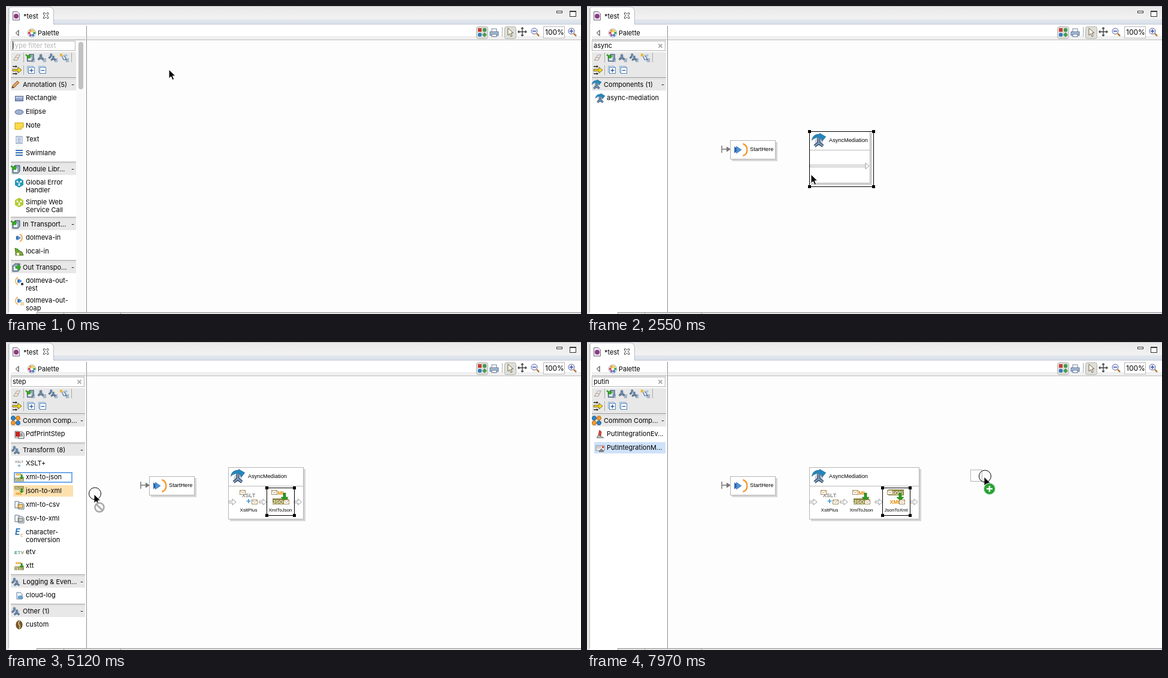
These frames come from a looping animation (960x514 px, 7990 ms). An HTML page:

```html
<!DOCTYPE html>
<html lang="en">
<head>
<meta charset="utf-8">
<title>Palette editor</title>
<style>
html, body { margin: 0; width: 100%; height: 100%; overflow: hidden; background: #fff; }
svg { display: block; width: 100vw; height: 100vh; }
text { font: 11px Inter, "Open Sans", sans-serif; fill: #000; white-space: pre; }
.node { font: 9.2px "Liberation Sans", Arial, sans-serif; }
.step { font: 8px "Liberation Sans", Arial, sans-serif; text-anchor: middle; }
.tag { font: bold 9px "Liberation Sans", Arial, sans-serif; text-anchor: middle; }
.zoom { font-size: 12px; }
.hint { fill: #b4b4b4; }
.hover { fill: #fce1af; }
.press { fill: #cfe2f9; }
.focus { fill: #fff; stroke: #70a9ea; stroke-width: 2; }
</style>
</head>
<body>
<svg id="stage" viewBox="0 0 960 514" preserveAspectRatio="none"></svg>
<script>
const LOOP = 7990;
const stage = document.getElementById('stage');

// Drawing helpers
const box = (x, y, w, h, fill, more = '') => `<rect x="${x}" y="${y}" width="${w}" height="${h}" fill="${fill}" ${more}/>`;
const shape = (d, fill, stroke = 'none', width = 1) => `<path d="${d}" fill="${fill}" stroke="${stroke}" stroke-width="${width}"/>`;
const dot = (x, y, r, fill, stroke = 'none') => `<circle cx="${x}" cy="${y}" r="${r}" fill="${fill}" stroke="${stroke}"/>`;
const text = (x, y, s, cls = '', more = '') => `<text x="${x}" y="${y}" class="${cls}" ${more}>${s.replace(/&/g, '&amp;')}</text>`;
const tag = (x, y, s, color) => text(x, y, s, 'tag', `style="fill:${color}"`);
const use = (name, x, y, scale = 1) => `<use href="#${name}" transform="translate(${x} ${y}) scale(${scale})"/>`;
const group = (id, body) => `<g id="${id}">${body}</g>`;
const at = (x, y, scale, body) => `<g transform="translate(${x} ${y}) scale(${scale})">${body}</g>`;

// Icons, centred on 0,0
const hex = color => shape('M0-8L7-4V4L0 8-7 4V-4Z', color) +
  shape('M-3-1.500L0 1V4M0 1L3-1.500', 'none', '#fff', 1) + [-3, 3].map(x => dot(x, -2, 1.6, '#fff')).join('') + dot(0, 3.5, 1.6, '#fff');
const cube = shape('M-4-3L-1-6H7V4L4 7H-5V-3Z', '#8ea6b8', '#3c5468') + box(-3, -1, 6, 6, '#eef4f8');
const greenArrow = shape('M-7-6L-3-3 0-6 1 1-6 1-4-1-8-4Z', '#35b01d', '#187a0d', .6);
const doc = (color, x = 0, y = 0) => shape(`M${x - 4} ${y - 5}h6l3 3v8h-9Z`, '#f1f6fc', color);
const play = shape('M-6-4.500L-1 0-6 4.500Z', '#2b62a8') + shape('M-3.500-4.500L3 0-3.500 4.500Z', '#4f94d6', '#2b62a8', .6);
const arc = shape('M1-6A6.500 6.500 0 0 1 1 6', 'none', '#f4952b', 1.6);
const portOut = shape('M-2-6A6.500 6.500 0 0 0-2 6', 'none', '#f4a53a', 1.4) + at(2, 0, .8, play);
const arms = 'M0-5V1L-5 5M0 1L5 5';
const figure = dot(0, 0, 5, '#c9d4de') + shape(arms, 'none', '#3d526c', 3.6) + shape(arms, 'none', '#87aacd', 1.3);
const pair = at(-2, -2, .85, figure) + at(2, 2, .85, figure);
const stripes = shape('M3 2.500H9M3 5H9M3 7.500H9', 'none', '#5c7ca6', 1.2);
const green = x => shape(`M${x - 2}-8h4v7h4l-6 6-6-6h4Z`, '#2e9a1f', '#166c10', .6);
const band = (s, y) => s === 'XML'
  ? tag(-1, y + 9, s, '#e08a00')
  : box(-13, y, 26, 10, '#8d8a4b') + tag(-1, y + 8.5, s, '#f7f1cf');
const convert = (top, bottom) => band(top, -14) + band(bottom, 1) + green(7);
const sheets = color => doc('#5c6f88', -3, -1) + doc('#5c6f88', 3, 1) + box(-2, -1, 8, 6, color, 'stroke="#775b20" stroke-width=".7"') + shape('M0 1H5M0 3H5', 'none', '#fff');
const lens = sign => shape('M3 3L7 7', 'none', '#b07a35', 2.5) + dot(-1, -1, 5, '#eef2ff', '#5c5f95') + shape(sign, 'none', '#3953a4', 1.5);
const page = color => doc('#9cb2cc', -1) + shape('M-4-1H2M-4 2H2', 'none', '#6fa2d6') + shape('M1 2H7L4 6Z', color);

const icons = {
  pencil: shape('M-6 6L-5 2 3-6 6-3-2 5Z', '#dba35e', '#8a5626') + shape('M-6 6L-5 3-3 5Z', '#333'),
  rect: box(-6.5, -3.5, 13, 8, '#8ba2cb', 'stroke="#50648f"') + box(-6, -3, 12, 3, '#b4c4df'),
  oval: '<ellipse rx="7" ry="4" fill="#9fb1d2" stroke="#5d709b"/>',
  note: shape('M-7-5H7V2L3 6H-7Z', '#ffdc45', '#c69c16') + shape('M7 2H3V6Z', '#fff3b0', '#c69c16', .7),
  lines: box(-5, -5.5, 10, 12, '#f0f5fb', 'stroke="#7f95b5"') + shape('M-3-3H3M-3-.5H3M-3 2H3M-3 4.500H3', 'none', '#6d8fbd'),
  lanes: shape('M-6-5H6M-6-1H6M-6 3H6', 'none', '#3670b3', 2),
  module: cube + greenArrow,
  outbox: cube + at(5, 1, 1, shape('M-5-2L-1-2V-6L4-1-1 4V1H-5Z', '#35b01d', '#187a0d', .6)),
  hexBlue: hex('#2498b8'), hexLime: hex('#b4cb32'),
  portIn: at(0, 0, .85, play) + arc,
  portRest: portOut + box(3, 3, 4, 4, '#445'),
  portSoap: portOut + box(3, 3, 4, 4, '#fff2c8', 'stroke="#c9973d" stroke-width=".7"'),
  startPort: at(-1.5, 0, .9, play) + shape('M3-7A7.500 7.500 0 0 1 3 7', 'none', '#f4952b', 1.6),
  local: shape('M-7-6L5 1 7 6H-6V1Z', '#83a838', '#4a6b1c') + box(-4, 2, 4, 4, '#fff') + shape('M-7-6L-2-5 0 1Z', '#2fa51c'),
  four: dot(-4, -4, 3.5, '#2f86c9', '#1d5c91') + dot(4, -4, 3.5, '#f29a2e', '#b86a10') + dot(-4, 4, 3.5, '#f29a2e', '#b86a10') + dot(4, 4, 3.5, '#2f86c9', '#1d5c91'),
  paged: page('#2f86c9'), pagedLocal: page('#d4a22a'),
  putEvent: shape('M-1-7L2-4 1 3H-3L-2-4Z', '#d9463a', '#8b231b', .7) + shape('M-6 6L-3 1 6 6Z', '#b9b9b9', '#555', .7),
  putMail: box(-7, -4, 14, 8, '#f3f3f3', 'stroke="#888"') + shape('M-6-2H2M-6 0H1', 'none', '#aaa') + shape('M-2 6L2 1 6 6Z', '#8a8a8a', '#444', .7) + box(3, -3, 3, 3, '#d9463a'),
  figures: pair,
  moduleList: cube + greenArrow + stripes, figureList: at(-1, -1, 1, figure) + stripes, figuresList: at(-1, -1, 1, pair) + stripes,
  async: at(0, 2, .95, figure) + shape('M-8 0Q-7-7 1-7L1-8 8-4 4 1 2-3Q-4-4-8 0Z', '#2387bd', '#155b86', .5),
  xslt: tag(0, -1, 'XSLT', '#8a8a8a') + shape('M0 2V9M-3.500 5.500H3.500', 'none', '#3f95cf', 1.6),
  xmlJson: convert('XML', 'JSON'), jsonXml: convert('JSON', 'XML'), xmlText: convert('XML', 'TEXT'),
  xmlCsv: sheets('#e4ad35'), csvXml: sheets('#8aa0b8'),
  chars: text(-7, 4, 'E', '', 'style="font-size:14px;font-style:italic;font-weight:bold;fill:#2779b8"') + text(2, 7, 'c', '', 'style="font-size:8px;fill:#e08b21"'),
  etv: at(0, 0, .88, ['E#3d9b64', 'T#479bc5', 'V#8a8a36'].map((s, i) => tag(i * 6 - 6, 3, s[0], s.slice(1))).join('')),
  log: doc('#5d7d9e') + shape('M-2 4q0-4 3-3 3-2 4 1 3 2 0 3H0Z', '#65a9dc', '#34709e', .6),
  bean: '<ellipse rx="5" ry="7" fill="#805c2c" stroke="#44300f"/>' + shape('M1-7Q-3-2 1 1 2 4 0 7', 'none', '#e5cc95', 1.4),
  pdf: doc('#666', -3, 0) + doc('#444', 3, 1) + box(-6, -4, 7, 8, '#c7271e') + shape('M1-1H6M1 1H6M1 3H6', 'none', '#444'),
  fork: shape('M-5-5L-1 4H5M-1-4L3 0V5', 'none', '#5d83b3', 1.6) + box(-8, -7, 5, 5, '#e8b63c') + box(1, -6, 5, 4, '#a9c2de') + stripes,
  eraser: shape('M-6 5L0-5H6L1 5Z', '#e9e5e0', '#a49c94') + shape('M-6 5L-3 0H3L1 5Z', '#f5e9da', '#a49c94'),
  flow: shape('M-7-6H0M-7 0H0M-7 6H0', 'none', '#222', 1.6) + shape('M-2-8L1-6-2-4ZM-2 4L1 6-2 8Z', '#222') + shape('M-7-1.500H2V-5L8 0 2 5V1.500H-7Z', '#f5d91f', '#54490b', .8),
  palette: dot(0, 0, 7, '#eef1f5', '#a9b0ba') + ['#45a345', '#3a78c9', '#8a5bb5', '#d84339', '#ee9a2b', '#e9cf3c']
    .map((c, i) => dot(4.2 * Math.cos(i * Math.PI / 3), 4.2 * Math.sin(i * Math.PI / 3), 2, c)).join(''),
  printer: box(-4, -6, 8, 6, '#fff', 'stroke="#6c83a3"') + box(-7, -1, 14, 6, '#a9bdd6', 'stroke="#546d90"') + box(-4, 3, 8, 4, '#fff', 'stroke="#546d90"'),
  zoomOut: lens('M-4-1H2'), zoomIn: lens('M-4-1H2M-1-4V2'),
  move: shape('M0-7V7M-7 0H7M-2-5L0-7 2-5M-2 5L0 7 2 5M-5-2L-7 0-5 2M5-2L7 0 5 2', 'none', '#444', 1.4),
  envelope: box(-4.5, -3.5, 9, 7, '#fffdf5', 'stroke="#a58c61"') + shape('M-4-3L0 1 4-3', 'none', '#a58c61', .8),
  hop: shape('M-6.500-1.500H0V-5L6 0 0 5V1.500H-6.500Z', '#fff', '#999'),
  pointer: shape('M0 0V15L3.500 11.800 6 17.500 8.600 16.300 6.200 10.800H11Z', '#000', '#fff'),
  ibeam: shape('M-3-7Q0-7 0-5 0-7 3-7M0-5V5M-3 7Q0 7 0 5 0 7 3 7M-2 1H2', 'none', '#000', 1.2),
  allow: dot(0, 0, 9.5, '#27a331', '#d7ead8') + shape('M0-5V5M-5 0H5', 'none', '#fff', 2.6),
  deny: dot(0, 0, 9, '#f6f6f6') + '<circle r="7.500" fill="none" stroke="#a8a8a8" stroke-width="2.500"/>' + shape('M-5-5L5 5', 'none', '#a8a8a8', 2.5)
};

// Palette contents: "#" starts a drawer, "|" separates icon and text lines
const stepItems = 'xslt|XSLT+;xmlJson|xml-to-json;jsonXml|json-to-xml;xmlCsv|xml-to-csv;csvXml|csv-to-xml;chars|character-|conversion;etv|etv;xmlText|xtt';
const lists = {
  all: '#pencil|Annotation (5);rect|Rectangle;oval|Ellipse;note|Note;lines|Text;lanes|Swimlane;#module|Module Libr...;hexBlue|Global Error|Handler;hexLime|Simple Web|Service Call;#module|In Transport...;portIn|dolmeva-in;local|local-in;#outbox|Out Transpo...;portRest|dolmeva-out-|rest;portSoap|dolmeva-out-|soap',
  ports: '#module|Module Library ...;hexLime|Simple Web|Service Call;#module|In Transports (1);portIn|dolmeva-in;#outbox|Out Transports ...;portRest|dolmeva-out-rest;portSoap|dolmeva-out-soap;#four|Common Comp...;paged|PagedGet;pagedLocal|PagedGetLocalP...;putEvent|PutIntegrationEv...;putMail|PutIntegrationM...',
  async: '#async|Components (1);async|async-mediation',
  stepNarrow: `#four|Common Co...;pdf|PdfPrintStep;#figures|Transform (8);${stepItems};#figures|Logging & E...;log|cloud-log;#figures|Other (1);bean|custom`,
  stepWide: `#four|Common Comp...;pdf|PdfPrintStep;#figures|Transform (8);${stepItems};#figures|Logging & Even...;log|cloud-log;#figures|Other (1);bean|custom`,
  puts: '#four|Common Comp...;putEvent|PutIntegrationEv...;putMail|PutIntegrationM...'
};
const thumb = { all: 79, stepNarrow: 429 };
const small = { xslt: .62, xmlJson: .6, jsonXml: .6, xmlText: .6 };

function paletteList(name) {
  const right = thumb[name] ? 117 : 132;
  let y = 127, back = box(8, 77, right - 8, 42, '#e8e8e8'), front = '';
  for (const row of lists[name].split(';')) {
    const [icon, first, second] = row.replace('#', '').split('|');
    if (row[0] === '#') {
      y += 4;
      back += box(8, y - 9, right - 8, 19, '#e8e8e8') + box(8, y - 12, right - 8, 1, '#8c8c8c') + box(8, y - 10, right - 8, 1, '#d0d0d0');
      front += use(icon, 16, y) + text(28, y + 4, first) + text(right - 8, y + 4, '-');
      y += 22;
    } else {
      front += use(icon, 22, y + 1, small[icon]) + text(33, y + 4, first) + (second ? text(33, y + 17, second) : '');
      y += second ? 33 : 23;
    }
  }
  const bar = thumb[name] ? box(117.5, 57, 16, 454, '#fafafa') + box(121, 60, 8, thumb[name], '#c1c1c1', 'rx="4"') : '';
  return [back + bar, front];
}

const divider = (x, y) => box(x, y, 1, 16, '#a8a8a8');
const expander = (x, sign) => at(x, 107, 1, box(-6.5, -6.5, 10, 10, '#dce9f7', 'stroke="#8eb0d3"') + box(-4.5, -4.5, 10, 10, '#fff', 'stroke="#5584b4"') +
  at(.5, .5, 1, shape(sign, 'none', '#26588f', 1.3)));
const paletteTools = divider(29, 78) + divider(109, 78) + divider(29, 99) +
  ['eraser', 'moduleList', 'figureList', 'figuresList', 'fork'].map((name, i) => use(name, i ? 21 + i * 19 : 18, 86, .9)).join('') +
  use('flow', 18, 107) + expander(42, 'M-3 0H3M0-3V3') + expander(61, 'M-3 0H3');

const chrome = box(0, 0, 960, 514, '#fdfdfd') + box(0, 0, 960, 22, 'url(#bar)') + box(0, 22, 960, 9, 'url(#band)') +
  box(0, 0, 960, 1, '#c4c4c4') + box(0, 30, 960, 1, '#c9ced6') + box(0, 4, 4, 510, '#e8e8e8') + box(4, 4, 1, 510, '#b4b4b4') +
  shape('M5 32V5Q5 1.500 9 1.500H71Q79.500 1.500 79.500 10V31H134', '#fff', '#b9bec6') + box(5, 31, 129, 26, '#fff') +
  box(135, 31, 825, 19, '#fff') + box(135, 50, 825, 6, '#f0f0f0') + box(135, 56, 825, 1, '#bdbdbd') +
  box(8, 50, 125, 6, '#f1f1f1') + box(8, 56, 125, 1, '#a6a6a6') + box(5, 57, 129, 454, '#fff') +
  shape('M11.500 9.500H19L22.500 13V23.500H11.500Z', '#f1edf5', '#75657e') + dot(17, 17, 4, '#8c3b7e') +
  text(29, 21, '*test') + shape('M62.500 11.500h2l2 2 2-2h2v2l-2 2.500 2 2.500v2h-2l-2-2-2 2h-2v-2l2-2.500-2-2.500Z', '#fff', '#333') +
  shape('M21 40.500L16.500 45 21 49.500Z', '#fff', '#222') + use('palette', 43, 45) + text(53, 49, 'Palette') +
  box(919.5, 8.5, 9, 3, '#fff', 'stroke="#333"') + box(941.5, 8.5, 10, 9, '#fff', 'stroke="#333"') + box(941, 8, 11, 2, '#333') +
  [785, 832].map(x => box(x + .5, 34.5, 19, 20, '#deded9', 'rx="3" stroke="#b5b5b0"')).join('') +
  box(788, 37, 6, 6, '#ca3b32') + dot(799, 40, 3.2, '#3f9b4d') + dot(791, 48, 3.2, '#347bbd') + shape('M799 44L803 48 799 52 795 48Z', '#449e58') +
  use('printer', 815, 44) + divider(828, 35) + shape('M838 37V49L841 46 843 51 845 50 843 45H847Z', '#fffbe8', '#6c6552') +
  use('move', 862, 43) + use('zoomOut', 883, 43) + box(897.5, 34.5, 35, 19, '#fff', 'stroke="#b8b8b8"') + text(900, 48, '100%', 'zoom') + use('zoomIn', 945, 43);

const footer = box(0, 511, 960, 3, '#e8e8e8') + box(5, 511, 47, 3, '#fff') + box(52, 511, 908, 1, '#8e8e8e') +
  [51, 96, 191].map(x => box(x, 511, 1, 3, '#9a9a9a')).join('');

const card = (x, y, w, h) => box(x + 3, y + 3, w + 1, h + 1, '#d6d6d6') + box(x + .5, y + .5, w, h, '#fff', 'stroke="#b4b4b4"');
const selection = (x, y, w, h) => box(x + .5, y + .5, w, h, 'none', 'stroke="#000"') +
  [x, x + w].flatMap(a => [y, y + h].map(b => box(a - 2, b - 2, 5, 5, '#000'))).join('');

const startNode = shape('M225 233V245M225 239H235', 'none', '#777', 1.5) + shape('M233 234.500L240 239 233 243.500Z', '#777') +
  card(239, 224, 75, 31) + use('startPort', 256, 240, 1.45) + text(272, 242, 'StartHere', 'node');

const stepIcons = ['xslt', 'xmlJson', 'jsonXml'], stepNames = ['XsltPlus', 'XmlToJson', 'JsonToXml'];
const stepX = [405, 458, 516], hopX = [378, 429, 487.5, 546];
function asyncNode(count) {
  const w = [102, 102, 126, 184][count];
  let out = card(371, 209, w - 1, 86) + box(372, 240, w - 1, 1, '#b9b9b9') + use('async', 387, 224, 1.45) + text(404, 227, 'AsyncMediation', 'node');
  if (!count) return out + box(372, 265.5, 94, 3, '#fff', 'stroke="#aaa"') + shape('M465 262L471 267 465 272Z', '#fff', '#999');
  for (let i = 0; i <= count; i++) out += use('hop', hopX[i], 267);
  for (let i = 0; i < count; i++) {
    out += use(stepIcons[i], stepX[i], 260) + use('envelope', stepX[i] - 10, 251) + use('envelope', stepX[i] + 10, 267) + text(stepX[i], 283, stepNames[i], 'step');
  }
  return out + selection(stepX[count - 1] - 23, 243, 46, 46);
}

// Palette rows: [hover, press, drop, blur, y, width]
const rows = [
  [740, 790, 960, 1390, 212, 98], [2200, 2260, 2430, 2430, 153, 119], [4080, 4180, 4420, 4740, 202, 73],
  [4740, 4800, 4950, 5310, 225, 99], [5040, 5140, 5310, 5870, 248, 100], [7630, 7690, LOOP, LOOP, 176, 119]
];

const fade = (id, from, to) => `<linearGradient id="${id}" x2="0" y2="1"><stop stop-color="${from}"/><stop offset="1" stop-color="${to}"/></linearGradient>`;
const listNames = Object.keys(lists), built = listNames.map(paletteList);
stage.innerHTML = '<defs>' + fade('bar', '#e8e8e8', '#f2f2f2') + fade('band', '#e4e8ef', '#d8dee8') +
  Object.entries(icons).map(([id, body]) => group(id, body)).join('') + '</defs>' + chrome +
  listNames.map((n, i) => group('back-' + n, built[i][0])).join('') +
  rows.map((r, i) => `<rect id="row${i}"/>`).join('') +
  listNames.map((n, i) => group('front-' + n, built[i][1])).join('') + paletteTools + box(134, 33, 1, 478, '#8f8f8f') +
  '<rect id="field" x="8.500" y="58.500" height="16" fill="#fff" stroke="#b3b3b3"/>' + box(11, 60, 0, 13, '#b3d7ff', 'id="mark"') +
  text(11, 70, '', '', 'id="query"') + text(11, 70, 'type filter text', 'hint', 'id="hint"') + group('clear', shape('M119.500 63.500L125.500 69.500M125.500 63.500L119.500 69.500', 'none', '#aaa', 1.8)) +
  box(11, 59, 1, 14, '#000', 'id="caret"') +
  group('start', startNode) + group('startSel', selection(224, 221, 93, 38)) +
  [0, 1, 2, 3].map(n => group('async' + n, asyncNode(n))).join('') + group('asyncSel', selection(371, 209, 107, 92)) + footer +
  '<rect id="ghost" width="19" height="19" fill="none" stroke="#b5b5b5"/>' +
  group('mouse', group('arrow', use('pointer', 0, 0)) + group('beam', use('ibeam', 0, 0)) +
    group('carry', dot(1.5, -1, 10, 'none', '#000') + group('yes', use('allow', 9, 20)) + group('no', use('deny', 9, 22))));

const el = id => document.getElementById(id);
const show = (id, on) => el(id).setAttribute('visibility', on ? 'inherit' : 'hidden');
const place = (id, attrs) => { for (const k in attrs) el(id).setAttribute(k, attrs[k]); };
const within = (t, a, b) => t >= a && t < b;

// Filter field over time: [time, list, text, selected]
const typing = (word, start, gap, list) => [...word].map((c, i) => [start + i * gap, list, word.slice(0, i + 1)]);
const views = [
  [0, 'all', ''], ...typing('dolme', 160, 48, 'all'), [400, 'ports', 'dolme'], [1390, 'ports', 'dolme', true],
  ...typing('async', 1570, 72, 'all'), [1910, 'async', 'async'], [2890, 'async', 'async', true], [3060, 'all', ''],
  ...typing('step', 3380, 85, 'all'), [3740, 'stepNarrow', 'step'], [4180, 'stepWide', 'step'], [5870, 'stepWide', 'step', true],
  [6500, 'all', ''], ...typing('putin', 7060, 50, 'all'), [7300, 'puts', 'putin']
];

// Drags: [start, end, x beyond which a drop is accepted]
const drags = [[800, 960, 135], [2270, 2430, 135], [4190, 4420, 371], [4800, 4950, 371], [5080, 5310, 371], [7690, LOOP, 135]];
const hidden = [[160, 570], [1570, 2090], [3380, 3980], [7060, 7530]];

// Pointer way points: time, x, y
const way = [
  [0, 272, 106], [570, 272, 106], [740, 62, 214], [800, 62, 214], [860, 208, 163], [880, 211, 187], [960, 226, 224], [1080, 238, 260],
  [1350, 95, 66], [2090, 95, 66], [2210, 75, 154], [2270, 75, 154], [2430, 371, 209], [2550, 374, 280], [2640, 354, 338],
  [2870, 95, 66], [3980, 95, 66], [4100, 86, 217], [4150, 62, 204], [4190, 62, 204], [4420, 412, 268], [4750, 75, 227],
  [4800, 75, 227], [4950, 446, 268], [5060, 70, 249], [5120, 145, 254], [5310, 512, 268], [5570, 62, 106], [5730, 50, 66],
  [6040, 50, 66], [6270, 95, 66], [7530, 95, 66], [7640, 70, 178], [7690, 70, 178], [7950, 638, 213], [7970, 662, 224], [LOOP, 683, 236]
];
const same = (a, b) => a[1] === b[1] && a[2] === b[2];
function slope(i, k) {
  const a = way[i - 1], b = way[i], c = way[i + 1];
  return !a || !c || same(a, b) || same(b, c) ? 0 : (c[k] - a[k]) / (c[0] - a[0]);
}
function pointer(t) {
  const i = Math.max(0, way.findIndex(p => p[0] > t) - 1);
  const a = way[i], b = way[i + 1], d = b[0] - a[0], u = (t - a[0]) / d, v = 1 - u;
  return [1, 2].map(k => Math.round(v * v * (1 + 2 * u) * a[k] + u * u * (3 - 2 * u) * b[k] + u * v * d * (v * slope(i, k) - u * slope(i + 1, k))));
}

function drawRow([hover, press, drop, blur, y, w], i, t) {
  const id = 'row' + i;
  show(id, within(t, hover, blur));
  if (t < drop) place(id, { class: t < press ? 'hover' : 'press', x: 12, y: y - 9, width: w, height: 19 });
  else place(id, { class: 'focus', x: 14, y: y - 7, width: w - 3, height: 16 });
}

function draw(t) {
  const [, list, query, marked] = views.findLast(v => v[0] <= t), wide = !thumb[list];
  for (const n of listNames) { show('back-' + n, n === list); show('front-' + n, n === list); }
  place('field', { width: wide ? 122 : 107 });
  el('query').textContent = query;
  place('mark', { width: marked ? el('query').getComputedTextLength() : 0 });
  show('hint', !query);
  show('caret', !query && t < 7020);
  show('clear', query && wide);
  rows.forEach((row, i) => drawRow(row, i, t));

  const steps = [4420, 4950, 5310].filter(s => t >= s).length;
  show('start', t >= 960);
  show('startSel', within(t, 960, 1080));
  for (let n = 0; n < 4; n++) show('async' + n, t >= 2430 && n === steps);
  show('asyncSel', within(t, 2430, 2650));

  const [x, y] = pointer(t), [ghostX, ghostY] = pointer(Math.max(0, t - 20));
  const drag = drags.find(d => within(t, d[0], d[1])), ok = drag && x > drag[2];
  const beam = !drag && x < 133 && y < 76;
  place('mouse', { transform: `translate(${x} ${y})`, visibility: hidden.some(h => within(t, h[0], h[1])) ? 'hidden' : 'visible' });
  show('arrow', !beam);
  show('beam', beam);
  show('carry', drag);
  show('yes', ok);
  show('no', drag && !ok);
  show('ghost', ok && drag[2] < 200);
  place('ghost', { x: ghostX + .5, y: ghostY + .5 });
}

const begin = performance.now();
function tick() {
  draw((performance.now() - begin) % LOOP);
  requestAnimationFrame(tick);
}
tick();
</script>
</body>
</html>
```
